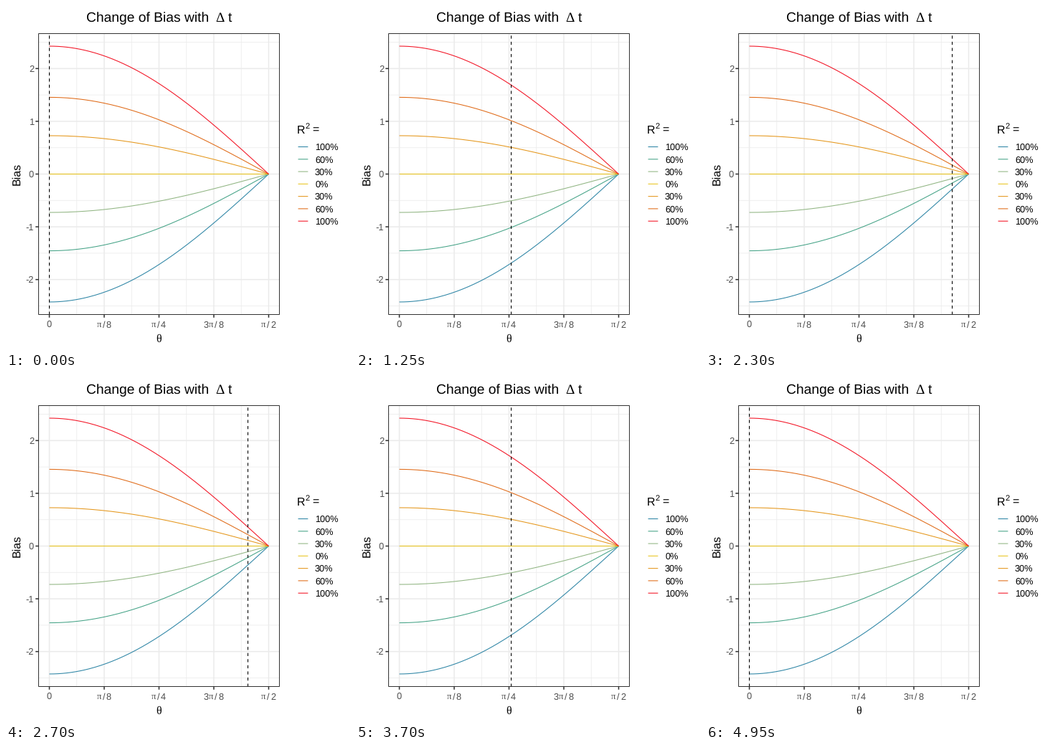
A matplotlib script that plays this animation: 480 px wide and 480 px high, repeating every 5 s.

```python
import numpy as np
import matplotlib.pyplot as plt
from matplotlib.animation import FuncAnimation
from matplotlib.patches import Rectangle

SIZE, FRAMES, INTERVAL = 480, 100, 50
SANS, SERIF = "Liberation Sans", "Liberation Serif"
GRID, DARK, LABEL = "#EBEBEB", "#333333", "#4D4D4D"
LEFT, RIGHT, TOP, BOTTOM = 45.2, 381.8, 38.2, 430.8
THIN = 1.07

plt.rcParams["text.hinting"] = "none"
fig = plt.figure(figsize=(SIZE / 72, SIZE / 72), dpi=72, facecolor="white")
ax = fig.add_axes([0, 0, 1, 1])
ax.set_xlim(0, SIZE)
ax.set_ylim(SIZE, 0)
ax.axis("off")


def px(part):
    """Pixel x for a fraction of pi/2."""
    return 60.5 + 306 * part


def py(bias):
    return 234.5 - 73.6 * bias


def line(xs, ys, color, width, z, **kw):
    return ax.plot(xs, ys, color=color, lw=width, zorder=z,
                   solid_capstyle="butt", snap=False, **kw)[0]


def text(x, y, s, size, color="black", font=SANS, ha="left", **kw):
    ax.text(x, y, s, fontsize=size, color=color, family=font,
            ha=ha, va="baseline", zorder=6, **kw)


# Grid and ticks
for k in range(4):
    x = px((k + 0.5) / 4)
    line([x, x], [TOP, BOTTOM], GRID, 0.78, 1)
for k in range(6):
    y = py(k - 2.5)
    line([LEFT, RIGHT], [y, y], GRID, 0.78, 1)
for k in range(5):
    x = px(k / 4)
    line([x, x], [TOP, BOTTOM], GRID, 1.55, 1)
    line([x, x], [BOTTOM, BOTTOM + 4], DARK, 1.55, 1)
for v in range(-2, 3):
    y = py(v)
    line([LEFT, RIGHT], [y, y], GRID, 1.55, 1)
    line([LEFT - 4, LEFT], [y, y], DARK, 1.55, 1)
    text(39, y + 4.6, str(v), 12.8, LABEL, ha="right")

ax.add_patch(Rectangle((45.5, 38.5), 336, 392, fill=False,
                       ec=DARK, lw=1, zorder=5, snap=False))

# Curves and legend
part = np.linspace(0, 1, 150)
series = [
    (-2.425, "#2F86A6", "100%"),
    (-1.455, "#47A488", "60%"),
    (-0.7275, "#92B684", "30%"),
    (0, "#E9C521", "0%"),
    (0.7275, "#E5981E", "30%"),
    (1.455, "#E06C1A", "60%"),
    (2.425, "#F31425", "100%"),
]
for i, (peak, color, name) in enumerate(series):
    line(px(part), py(peak * np.cos(part * np.pi / 2)), color, THIN, 3)
    y = 196.5 + 17.28 * i
    line([407.6, 421.4], [y, y], color, THIN, 3)
    text(431, y + 4.6, name, 12.8)

text(406, 178, "R", 16)
text(417.5, 171, "2", 11.2)
text(427.3, 178, "=", 16)

# Titles
text(112, 22, "Change of Bias with", 19.2)
text(298.8, 22, "Δ", 19.2, font=SERIF, ha="center")
text(309.5, 22, "t", 19.2)
text(213.5, 469, "θ", 16, font=SERIF, ha="center")
text(19.5, 234.5, "Bias", 16, ha="center", rotation=90, rotation_mode="anchor")

# Angle labels
text(px(0), 448, "0", 12.8, LABEL, ha="center")
for k, top, bottom in [(1, "", "8"), (2, "", "4"), (3, "3", "8"), (4, "", "2")]:
    shift = 3.5 if top else 0
    pieces = [(-7.2, "π", SERIF), (-0.3, "/", SANS), (6.2, bottom, SANS)]
    if top:
        pieces.append((-14.3, top, SANS))
    for dx, s, font in pieces:
        text(px(k / 4) + dx + shift, 449, s, 12.8, LABEL, font, "center")

marker = line([px(0)] * 2, [BOTTOM, TOP], "black", THIN, 4,
              linestyle=(0, (4, 4)), dash_capstyle="butt")

# Sweep out to pi/2 and back, resting one frame at the far end
STEPS = [0, 10, 25, 37, 46, 49]
PLACES = [0, 0.2075, 0.51, 0.7485, 0.925, 1]


def update(i):
    x = px(np.interp(min(i, FRAMES - 1 - i), STEPS, PLACES))
    marker.set_xdata([x, x])
    return (marker,)


anim = FuncAnimation(fig, update, frames=FRAMES, interval=INTERVAL,
                     repeat=True, repeat_delay=0, blit=False)
plt.show()
```
